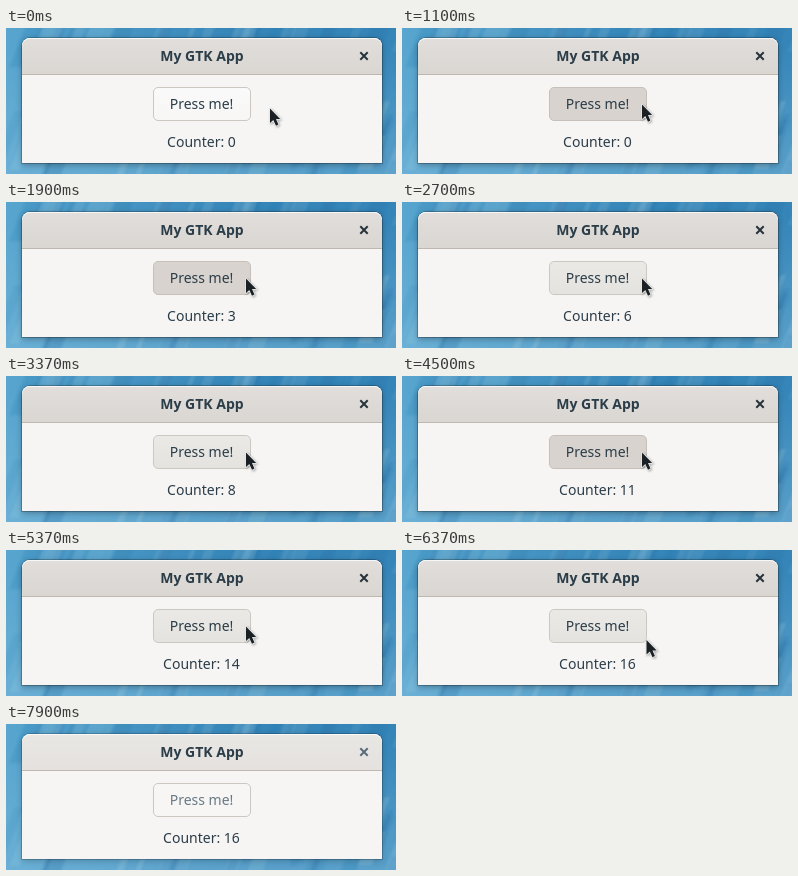
An HTML page that plays this animation: 390 px wide and 146 px high, repeating every 7970 ms.

```html
<!DOCTYPE html>
<html lang="en">
<head>
<meta charset="utf-8">
<title>Press counter</title>
<style>
  html, body { margin: 0; width: 100%; height: 100%; overflow: hidden; }
  body { position: relative; background: #4595c4; }
  svg { position: absolute; left: 0; top: 0; width: 390px; height: 146px; }
  .window {
    position: absolute; left: 16px; top: 10px; width: 360px; height: 125px;
    border-radius: 8px 8px 0 0; background: #f6f5f4;
    box-shadow: 0 2px 6px rgba(0,0,0,.3), 0 0 0 1px rgba(0,0,0,.24);
  }
  .header {
    box-sizing: border-box; height: 37px; border-radius: 8px 8px 0 0;
    border-bottom: 1px solid #bfb8b1;
    background: linear-gradient(#e1dedb, #dad6d2);
    box-shadow: inset 0 1px rgba(255,255,255,.75);
  }
  .button {
    position: absolute; left: 131px; top: 49px; width: 98px; height: 34px;
    box-sizing: border-box; border: 1px solid #cdc7c2; border-radius: 5px;
    background: linear-gradient(#fbfafa, #f7f6f5);
  }
  .hover .button { background: linear-gradient(#ebe9e6, #e5e3df); }
  .pressed .button { background: #d8d3ce; border-color: #c6c0b9; }
  .backdrop .window { box-shadow: 0 2px 6px rgba(0,0,0,.2), 0 0 0 1px rgba(0,0,0,.2); }
  .backdrop .header { background: linear-gradient(#e9e7e4, #e4e1de); }
  .backdrop .button { background: #f7f6f5; }
  text { font: 14px "Noto Sans", "Open Sans", sans-serif; text-anchor: middle; fill: #2b3d48; }
  .title { font-weight: 700; }
  .close { stroke: #26333b; stroke-width: 2; }
  .backdrop .label { fill: #687a86; }
  .backdrop .close { stroke: #586c7a; }
  #cursor { filter: drop-shadow(1px 1px 1px rgba(0,0,0,.3)); }
</style>
</head>
<body>
<svg viewBox="0 0 390 146" aria-hidden="true">
  <defs>
    <linearGradient id="sky" x2=".6" y2="0">
      <stop offset="0" stop-color="#58a5cf"/>
      <stop offset="1" stop-color="#3585b8"/>
    </linearGradient>
    <linearGradient id="haze" x2="0" y2="1">
      <stop offset=".1" stop-color="#7dbbdc" stop-opacity="0"/>
      <stop offset="1" stop-color="#7dbbdc" stop-opacity=".5"/>
    </linearGradient>
    <filter id="soft"><feGaussianBlur stdDeviation=".8"/></filter>
  </defs>
  <rect width="390" height="146" fill="url(#sky)"/>
  <rect width="390" height="146" fill="url(#haze)"/>
  <g id="strokes" filter="url(#soft)"></g>
</svg>
<div class="window">
  <div class="header"></div>
  <div class="button"></div>
</div>
<svg viewBox="0 0 390 146">
  <text class="title" x="196" y="33">My GTK App</text>
  <path class="close" d="M354.3 24.3l7.4 7.4m0-7.4l-7.4 7.4"/>
  <text class="label" x="195.5" y="81">Press me!</text>
  <text id="count" x="195.5" y="119">Counter: 0</text>
  <path id="cursor" d="M0 0V14.5L3.3 11.5 6 17.2 8.4 16.1 6 10.5H10.2Z"
        fill="#1b2024" stroke="#e8eaeb" stroke-width="1.6" stroke-linejoin="round" paint-order="stroke"/>
</svg>
<script>
  const LOOP = 7970, STEP = 200 / 3;
  const ENTER = 430, REST = 900, LEAVE = 6370, GONE = 6570, BACKDROP = 7900;
  const FIRST_CLICK = 1100, PRESSES = 16;

  const count = document.getElementById('count');
  const cursor = document.getElementById('cursor');
  const start = performance.now();

  const progress = (t, a, b) => Math.min(1, Math.max(0, (t - a) / (b - a)));
  const smooth = p => p * p * (3 - 2 * p);

  // Brushed diagonal wallpaper strokes, light and dark
  function paintWallpaper() {
    let seed = 7;
    const rnd = () => (seed = seed * 16807 % 2147483647) / 2147483647;
    let html = '';
    for (let i = 0; i < 70; i++) {
      const x = rnd() * 410 - 10, y = rnd() < .5 ? -6 : 60 + rnd() * 75;
      const w = 4 + rnd() * 14, h = 14 + rnd() * 36;
      const fill = rnd() < .5 ? '#a3d0e4' : '#20689f';
      html += `<path d="M${x} ${y}h${w}l${-h * .4} ${h}h${-w}z" fill="${fill}" opacity="${.08 + rnd() * .2}"/>`;
    }
    document.getElementById('strokes').innerHTML = html;
  }

  // Presses and releases alternate, slowing slightly as they go on
  function clickSteps(t) {
    if (t < FIRST_CLICK) return 0;
    const n = Math.floor(((t - FIRST_CLICK) / 108) ** (1 / 1.114)) + 1;
    return Math.min(n, PRESSES * 2);
  }

  function render(t) {
    const tick = Math.floor(t / STEP) * STEP;
    const into = smooth(progress(tick, ENTER, REST));
    const out = progress(t < LEAVE ? t : tick + STEP, LEAVE, GONE);
    const x = 264 - 24 * into + 30 * out;
    const y = 80.5 - 4 * into + 90 * out;
    cursor.setAttribute('transform', `translate(${x} ${y})`);

    const steps = clickSteps(t);
    count.textContent = 'Counter: ' + Math.floor(steps / 2);

    const over = x < 245 && y < 93;
    document.body.className =
      t >= BACKDROP ? 'backdrop' : steps % 2 ? 'pressed' : over ? 'hover' : '';
  }

  function loop() {
    render((performance.now() - start) % LOOP);
    requestAnimationFrame(loop);
  }
  paintWallpaper();
  loop();
</script>
</body>
</html>
```
